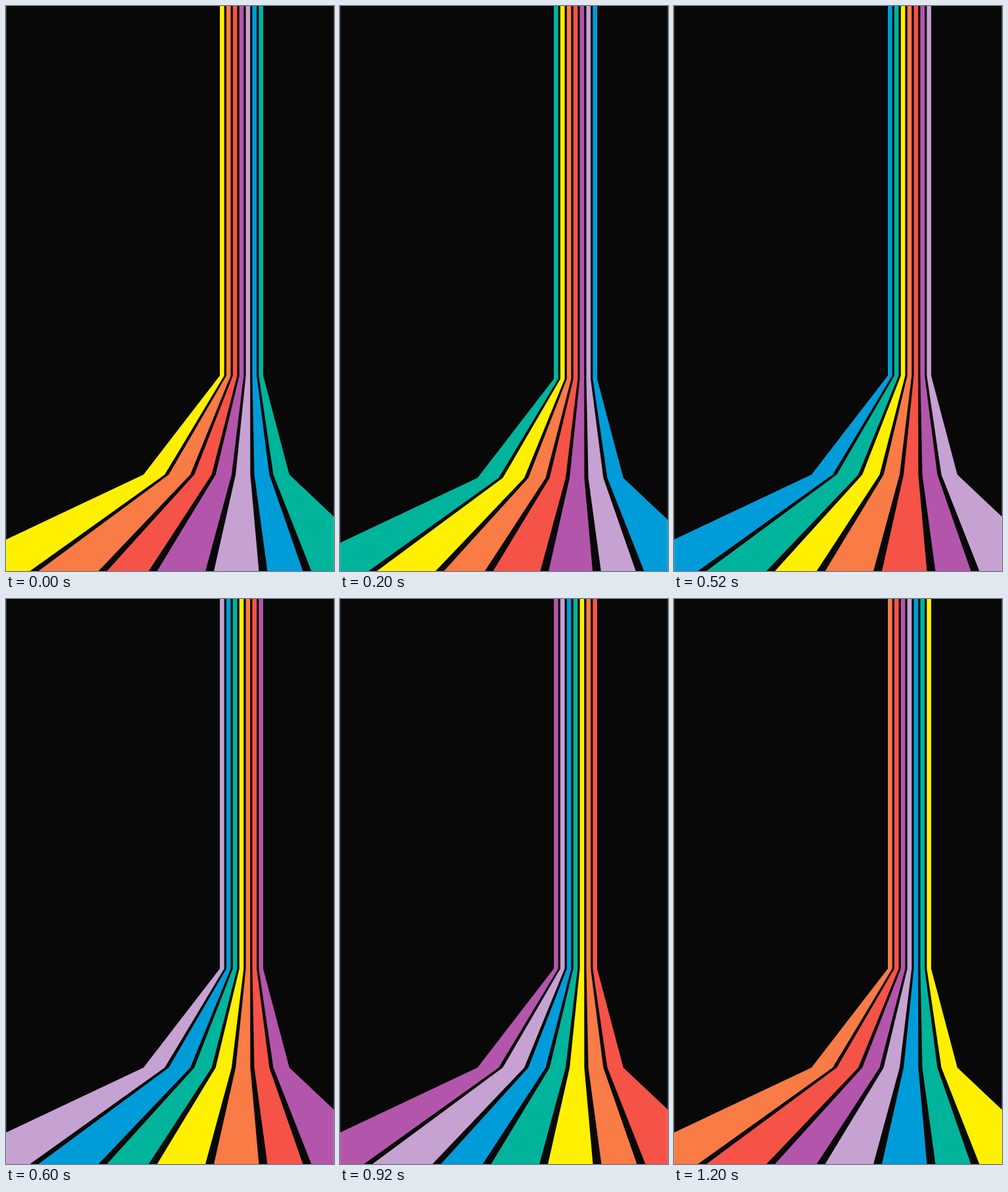
Animation, 500 px wide and 859 px high, one loop 1.4 s. Source, as an HTML page:

```html
<!DOCTYPE html>
<html lang="en">
<head>
<meta charset="utf-8">
<title>Rainbow bands</title>
<style>
  html, body { margin: 0; width: 100%; height: 100%; overflow: hidden; background: #080808; }
  svg { display: block; width: 100%; height: 100%; }
</style>
</head>
<body>
<svg viewBox="0 0 500 859" preserveAspectRatio="none">
  <rect width="500" height="859" fill="#080808"/>
  <g id="bands"></g>
  <path d="M.5 0V859M499.5 0V859" stroke="#fff" stroke-opacity=".2"/>
</svg>
<script>
const COLORS = ['#fff000', '#f97b46', '#f55347', '#b455ac', '#c6a2d2', '#009cd9', '#00b49c'];
const COUNT = COLORS.length;
const STEP = 200;
const PAST = 20; // overrun that keeps the stage filled when the bands sink

// Seams between neighbouring bands, and the dark gap along them, at three heights.
const bend = { y: 562, gap: 3.3, seam: i => 324.35 + 9.9 * i };
const knee = { y: 712.5, gap: 6.2, seam: i => [206.5, 245, 284, 316.5, 347, 375.5, 404.5, 435][i] };
const floor = { y: 859, gap: 13, seam: i => [-108, 43, 147.5, 224, 310.5, 392, 459, 594][i] };

// One side of a seam: side 1 borders the band on its right, -1 the band on its left.
function edge(i, side) {
  const [top, mid, low] = [bend, knee, floor].map(level => level.seam(i) + side * level.gap / 2);
  const end = low + (low - mid) * PAST / (floor.y - knee.y);
  return [[top, -PAST], [top, bend.y], [mid, knee.y], [end, floor.y + PAST]];
}

const group = document.getElementById('bands');
const bands = COLORS.map((_, i) => {
  const band = document.createElementNS('http://www.w3.org/2000/svg', 'polygon');
  band.setAttribute('points', [...edge(i, 1), ...edge(i + 1, -1).reverse()].join(' '));
  return group.appendChild(band);
});

// Colours hop one band to the right each step; the second pose sits lower.
function draw(time) {
  const step = Math.floor(time / STEP) % COUNT;
  bands.forEach((band, i) => band.setAttribute('fill', COLORS[(i - step + COUNT) % COUNT]));
  group.setAttribute('transform', `translate(0 ${step === 1 ? 5 : 0})`);
}

const start = performance.now();
function tick() {
  draw(performance.now() - start);
  requestAnimationFrame(tick);
}
tick();
</script>
</body>
</html>
```
